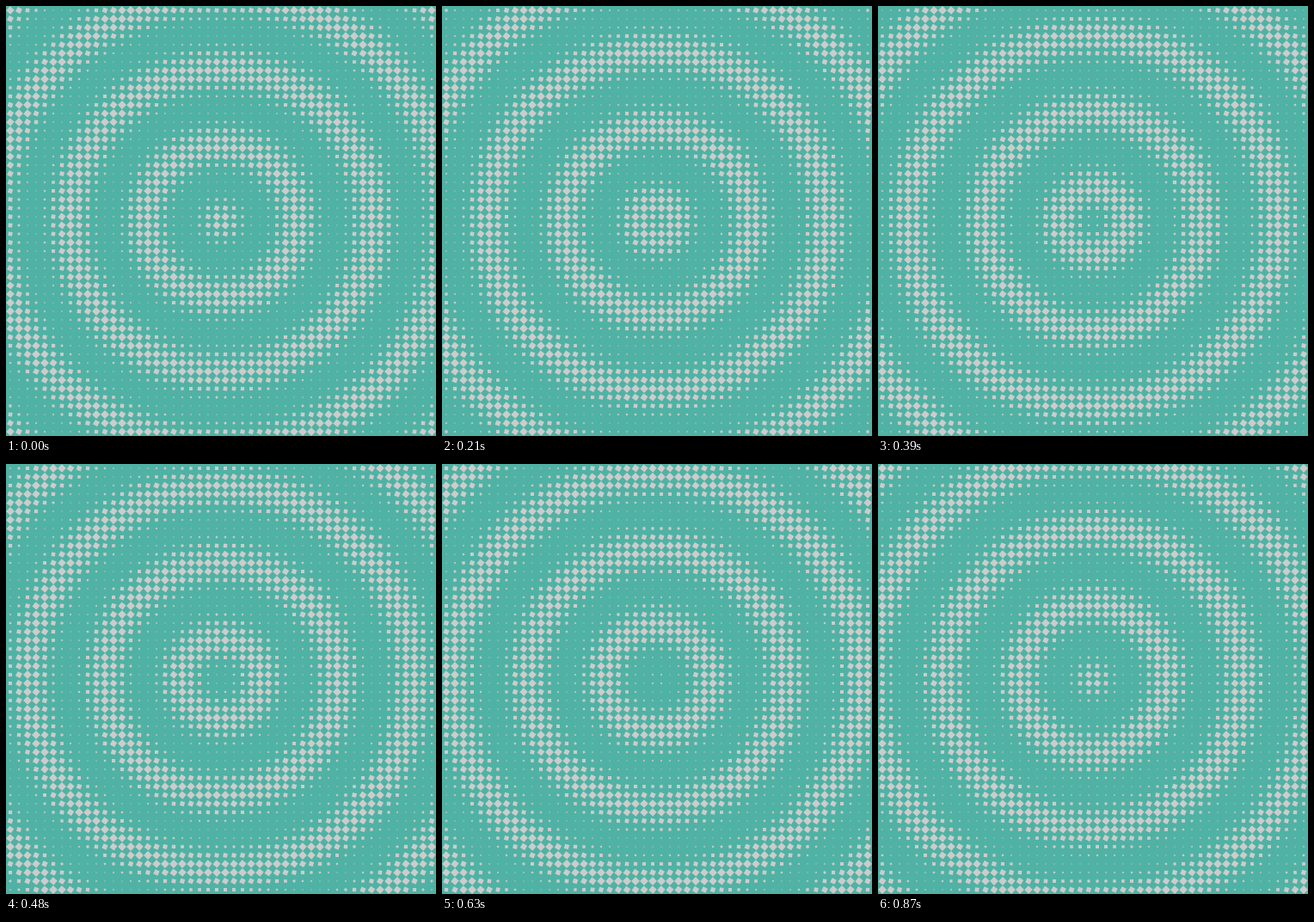
An HTML page with a canvas that plays this animation: 500 px wide and 500 px high, repeating every 0.9 s.

```html
<!DOCTYPE html>
<html>
<head>
<meta charset="utf-8">
<style>
html, body { margin: 0; width: 100%; height: 100%; overflow: hidden; background: #50b2a4; }
canvas { display: block; }
</style>
</head>
<body>
<canvas id="stage" width="500" height="500"></canvas>
<script>
const ctx = document.getElementById('stage').getContext('2d');
const SIZE = 500, CELL = 10, WAVELENGTH = 88;
const LOOP = 900, STEP = 30;

function drawSquare(x, y, wave) {
  const side = 4 + 3 * wave;
  ctx.save();
  ctx.translate(x, y);
  ctx.rotate(wave * Math.PI / 4);
  ctx.fillRect(-side / 2, -side / 2, side, side);
  ctx.restore();
}

function draw(time) {
  const progress = Math.floor(time % LOOP / STEP) * STEP / LOOP;
  ctx.fillStyle = '#50b2a4';
  ctx.fillRect(0, 0, SIZE, SIZE);
  ctx.fillStyle = '#cccccc';
  for (let y = CELL / 2; y < SIZE; y += CELL) {
    for (let x = CELL / 2; x < SIZE; x += CELL) {
      const distance = Math.hypot(x - SIZE / 2, y - SIZE / 2);
      drawSquare(x, y, Math.cos(2 * Math.PI * (distance / WAVELENGTH - progress)));
    }
  }
}

const start = performance.now();
function tick() {
  draw(performance.now() - start);
  requestAnimationFrame(tick);
}
tick();
</script>
</body>
</html>
```
